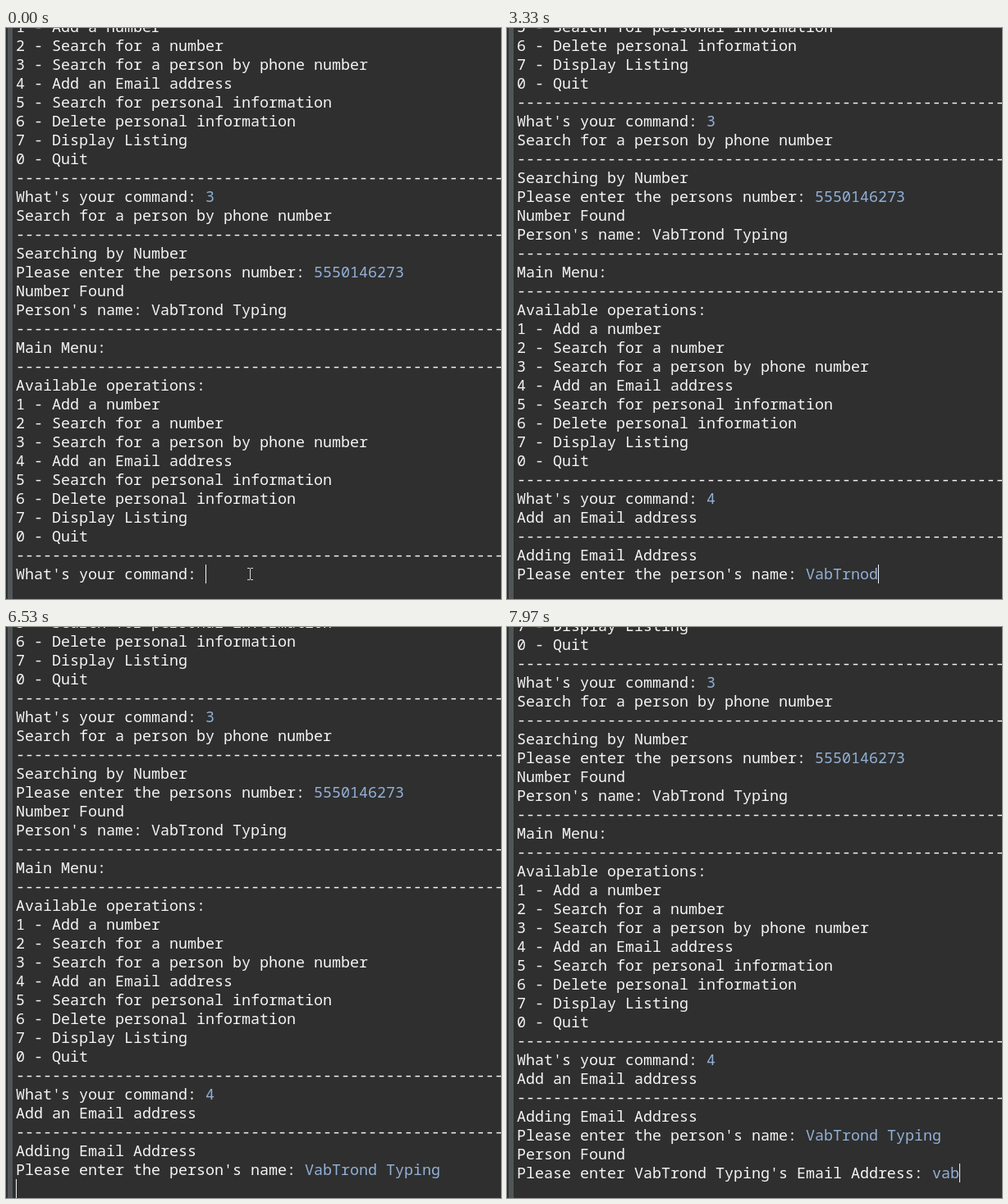
An HTML page with a canvas that plays this animation: 603x696 px, repeating every 8 s.

```html
<!DOCTYPE html>
<html lang="en">
<head>
<meta charset="utf-8">
<title>Phone book console</title>
<style>
  html, body { margin: 0; width: 100%; height: 100%; overflow: hidden; background: #2f2f2f; }
  canvas { display: block; }
</style>
</head>
<body>
<canvas id="stage" width="603" height="696"></canvas>
<script>
const ctx = document.getElementById('stage').getContext('2d');
const LOOP = 8000, BLINK = 500;
const LEFT = 12, TOP = -13, ROW = 23, COL = 11, BASELINE = 18;
const OUTPUT = '#f4f4f4', INPUT = '#92b0d6';

const NAME = 'VabTrond Typing', TYPO = 'VabTrnod ', SLIP = 'VabTrondT';
const RULE = '-'.repeat(56);
const OPERATIONS = [
  '1 - Add a number',
  '2 - Search for a number',
  '3 - Search for a person by phone number',
  '4 - Add an Email address',
  '5 - Search for personal information',
  '6 - Delete personal information',
  '7 - Display Listing',
  '0 - Quit',
  RULE
];
const COMMAND = "What's your command: ";
const ASK_NAME = "Please enter the person's name: ";
const ASK_EMAIL = `Please enter ${NAME}'s Email Address: `;

// What the console shows from a given time on; the caret sits at the end of
// an input row, or at the left edge of any other row.
const STAGES = [
  { from: -220, rows: 30, caret: 29, scroll: 0 },
  { from: 960, rows: 34, caret: 30, scroll: 92 },
  { from: 2390, rows: 34, caret: 33, scroll: 92 },
  { from: 6530, rows: 34, caret: 34, scroll: 96 },
  { from: 6650, rows: 36, caret: 34, scroll: 115 },
  { from: 6800, rows: 36, caret: 34, scroll: 138 },
  { from: 7700, rows: 36, caret: 35, scroll: 138 }
];

// Runs of evenly spaced keystrokes: the length goes from first to last.
const burst = (row, text, from, to, first, last) => ({ row, text, from, to, first, last });
const BURSTS = [
  burst(29, '4', 560, 960, 1, 1),
  burst(33, TYPO, 2390, 3450, 1, 9),
  burst(33, TYPO, 3730, 4120, 8, 5),
  burst(33, SLIP, 4520, 4920, 6, 9),
  burst(33, NAME, 5350, 5500, 8, 9),
  burst(33, NAME, 5500, 6130, 9, 15),
  burst(35, 'vab', 7700, 7970, 1, 3)
];

const latest = (list, t) => list.findLast(item => item.from <= t);

function typedIn(row, t) {
  const run = latest(BURSTS.filter(b => b.row === row), t);
  if (!run) return '';
  const progress = Math.min(1, (t - run.from) / (run.to - run.from));
  return run.text.slice(0, run.first + Math.trunc((run.last - run.first) * progress));
}

// A row is plain output, or a pair of prompt and typed input.
const rowsAt = t => [
  ...OPERATIONS,
  [COMMAND, '3'],
  'Search for a person by phone number',
  RULE,
  'Searching by Number',
  ['Please enter the persons number: ', '5550146273'],
  'Number Found',
  `Person's name: ${NAME}`,
  RULE,
  'Main Menu:',
  RULE,
  'Available operations:',
  ...OPERATIONS,
  [COMMAND, typedIn(29, t)],
  'Add an Email address',
  RULE,
  'Adding Email Address',
  [ASK_NAME, typedIn(33, t)],
  'Person Found',
  [ASK_EMAIL, typedIn(35, t)]
];

function caretVisible(stage, t) {
  const run = latest(BURSTS, t);
  const lastKey = run ? Math.min(t, run.to) : stage.from;
  return Math.floor((t - Math.max(stage.from, lastKey)) / BLINK) % 2 === 0;
}

function drawPointer() {
  ctx.fillStyle = '#d8d8d8';
  ctx.fillRect(297, 659, 1, 13);
  for (const y of [658, 672]) {
    ctx.fillRect(294, y, 3, 1);
    ctx.fillRect(298, y, 3, 1);
  }
}

function draw(t) {
  ctx.fillStyle = '#2f2f2f';
  ctx.fillRect(0, 0, 603, 696);
  ctx.fillStyle = '#515658';
  ctx.fillRect(2, 0, 6, 696);

  const stage = latest(STAGES, t);
  const rows = rowsAt(t).slice(0, stage.rows);
  const rowTop = i => TOP + i * ROW - stage.scroll;
  ctx.font = `500 ${COL / 0.6}px "Noto Sans Mono", monospace`;
  rows.forEach((row, i) => {
    const [prompt, typed = ''] = [].concat(row);
    const y = rowTop(i) + BASELINE;
    ctx.fillStyle = OUTPUT;
    ctx.fillText(prompt, LEFT, y);
    ctx.fillStyle = INPUT;
    ctx.fillText(typed, LEFT + prompt.length * COL, y);
  });

  if (caretVisible(stage, t)) {
    const row = rows[stage.caret];
    const column = Array.isArray(row) ? row.join('').length : 0;
    ctx.fillStyle = OUTPUT;
    ctx.fillRect(LEFT + column * COL, rowTop(stage.caret), 1, ROW);
  }
  if (t < 560) drawPointer();
}

const start = performance.now();
function tick() {
  draw((performance.now() - start) % LOOP);
  requestAnimationFrame(tick);
}
tick();
</script>
</body>
</html>
```
